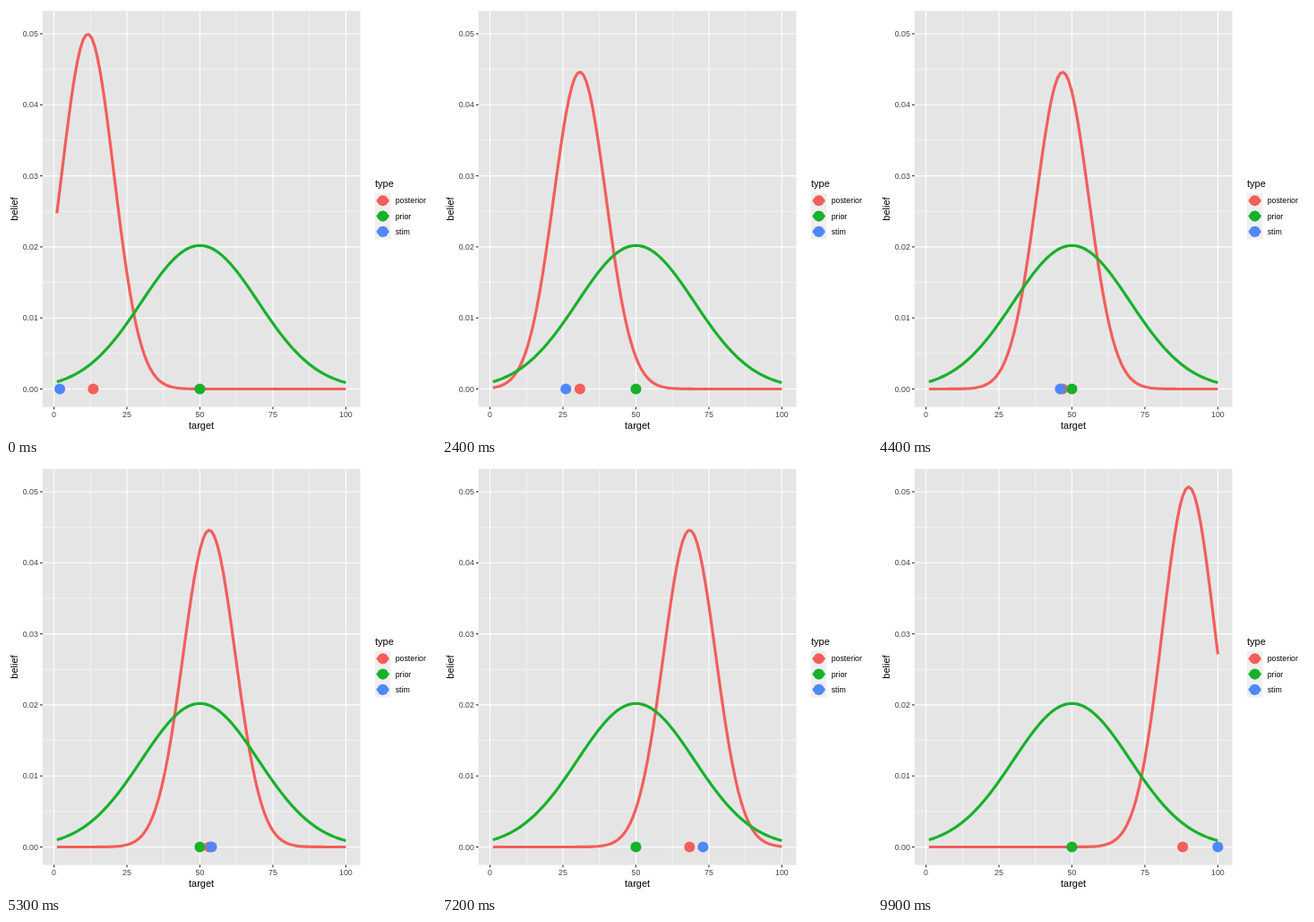
Recreate the animation shown at these times as an HTML page. Size 480 px wide and 480 px high, loop 10 s.

```html
<!DOCTYPE html>
<html lang="en">
<head>
<meta charset="utf-8">
<title>Prior, stimulus and posterior</title>
<style>
  html, body { margin: 0; width: 100%; height: 100%; overflow: hidden; background: #fff; }
  svg { display: block; width: 480px; height: 480px; }
  text { font: 11px "Liberation Sans", Arial, sans-serif; fill: #000; }
  text.small { font-size: 8.8px; }
  text.tick { fill: #404040; }
</style>
</head>
<body>
<svg id="plot" viewBox="0 0 480 480"></svg>
<script>
const svg = document.getElementById('plot');
const RED = '#f35e5a', GREEN = '#17b12b', BLUE = '#5086ff';
const LEFT = 40.7, RIGHT = 395.5, TOP = 5.5, BOTTOM = 447.6;
const PRIOR_MEAN = 50, PRIOR_SD = 20, STIM_SD = 10;
const WEIGHT = PRIOR_SD ** 2 / (PRIOR_SD ** 2 + STIM_SD ** 2);
const POST_SD = STIM_SD * Math.sqrt(WEIGHT);
const targets = Array.from({ length: 100 }, (_, i) => i + 1);

const px = v => 53.56 + v * 3.258;
const py = v => 427.5 - v * 7930;

function add(tag, attrs, text = '') {
  const el = document.createElementNS('http://www.w3.org/2000/svg', tag);
  for (const name in attrs) el.setAttribute(name, attrs[name]);
  el.textContent = text;
  return svg.appendChild(el);
}
const line = (x1, y1, x2, y2, stroke, width) =>
  add('line', { x1, y1, x2, y2, stroke, 'stroke-width': width });
const vertical = (v, width) => line(px(v), TOP, px(v), BOTTOM, '#fff', width);
const horizontal = (v, width) => line(LEFT, py(v), RIGHT, py(v), '#fff', width);
const label = (x, y, text, cls = '', anchor = 'start') =>
  add('text', { x, y, class: cls, 'text-anchor': anchor }, text);
const dot = (cx, cy, fill) => add('circle', { cx, cy, r: 6.05, fill });
const curve = stroke => add('polyline',
  { fill: 'none', stroke, 'stroke-width': 3.2, 'stroke-linejoin': 'round' });

// Normal density, normalised over the integer targets
function belief(mean, sd) {
  const raw = targets.map(x => Math.exp(-0.5 * ((x - mean) / sd) ** 2));
  const sum = raw.reduce((a, b) => a + b);
  return raw.map(v => v / sum);
}
const setCurve = (el, density) =>
  el.setAttribute('points', density.map((p, i) => px(targets[i]) + ',' + py(p)).join(' '));

// Panel, grid and axes
add('rect', { x: LEFT, y: TOP, width: RIGHT - LEFT, height: BOTTOM - TOP, fill: '#e5e5e5' });
for (let i = 0; i < 4; i++) vertical(12.5 + 25 * i, 0.53);
for (let i = 0; i < 5; i++) horizontal(0.005 + 0.01 * i, 0.53);
for (let i = 0; i < 5; i++) {
  const v = 25 * i;
  vertical(v, 1.07);
  line(px(v), BOTTOM, px(v), BOTTOM + 2.74, '#272727', 1.07);
  label(px(v), 459, v, 'small tick', 'middle');
}
for (let i = 0; i < 6; i++) {
  const v = 0.01 * i;
  horizontal(v, 1.07);
  line(LEFT - 2.74, py(v), LEFT, py(v), '#272727', 1.07);
  label(35.8, py(v) + 3.15, v.toFixed(2), 'small tick', 'end');
}
label(218.1, 472, 'target', '', 'middle');
label(0, 0, 'belief', '', 'middle').setAttribute('transform', 'translate(13.4 226.5) rotate(-90)');

// Legend
label(412, 202, 'type');
[['posterior', RED], ['prior', GREEN], ['stim', BLUE]].forEach(([name, color], i) => {
  const y = 217.3 + 17.28 * i;
  add('rect', { x: 412, y: y - 8.64, width: 17.28, height: 17.28, fill: '#efefef' });
  line(413.73, y, 427.55, y, color, 3.2);
  dot(420.64, y, color);
  label(434.7, y + 3.15, name, 'small');
});

// Data
const postCurve = curve(RED);
setCurve(curve(GREEN), belief(PRIOR_MEAN, PRIOR_SD));
const postDot = dot(0, py(0), RED);
dot(px(PRIOR_MEAN), py(0), GREEN);
const stimDot = dot(0, py(0), BLUE);

function draw(now) {
  const step = Math.floor(now % 10000 / 100);
  // One unit per step, slightly slower around the middle
  const stim = Math.min(step + 2, Math.max(step + 1, 50 + (step - 48) * 2 / 3));
  const density = belief(WEIGHT * stim + (1 - WEIGHT) * PRIOR_MEAN, POST_SD);
  const mean = density.reduce((sum, p, i) => sum + p * targets[i], 0);
  setCurve(postCurve, density);
  postDot.setAttribute('cx', px(mean));
  stimDot.setAttribute('cx', px(stim));
}
function tick() {
  draw(performance.now());
  requestAnimationFrame(tick);
}
tick();
</script>
</body>
</html>
```
